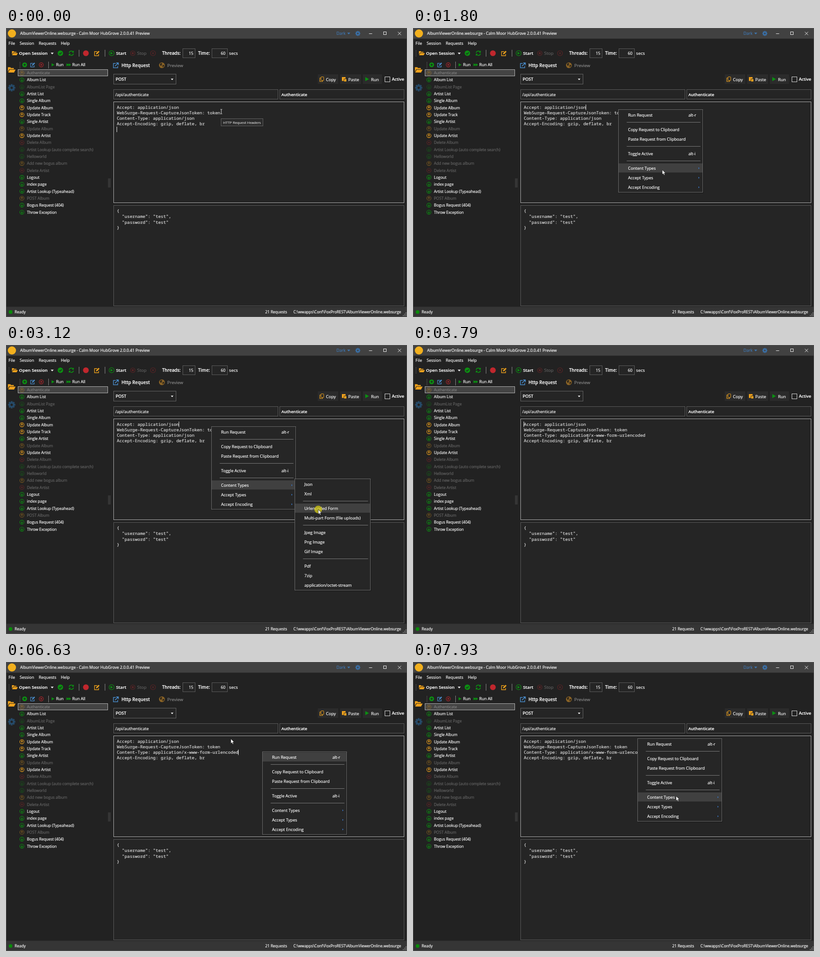
These frames come from a looping animation (881x636 px, 8000 ms). An HTML page:

```html
<!DOCTYPE html>
<html lang="en">
<head>
<meta charset="utf-8">
<title>Request editor</title>
<style>
  html, body { margin: 0; width: 100%; height: 100%; overflow: hidden; background: #222; }
  svg { display: block; width: 881px; height: 636px; }
  text { font-family: "Open Sans", "Noto Sans", sans-serif; white-space: pre;
         fill: currentColor; stroke: currentColor; stroke-width: .2px; }
  .mono { font-family: "Noto Sans Mono", "DejaVu Sans Mono", monospace; font-size: 9.47px; color: #dcdcdc; }
  .semi { font-weight: 600; }
</style>
</head>
<body>
<svg id="stage" viewBox="0 0 881 636" xmlns="http://www.w3.org/2000/svg"></svg>
<script>
const GREEN = '#0c8f12', ORANGE = '#f0a21c', RED = '#b3262b', BLUE = '#4a8fd0';
const LOOP = 8000, CHAR = 5.68, LEFT = 243.5, LINE = 12.15;

// ---- drawing helpers ----
const text = (x, y, s, size = 9.1, color = '#fff', cls = '') =>
  `<text x="${x}" y="${y}" font-size="${size}" style="color:${color}" class="${cls}">${s}</text>`;
const semi = (x, y, s, size = 9.7) => text(x, y, s, size, '#fff', 'semi');
const mono = (y, s, id = '') => `<text x="${LEFT}" y="${y}" class="mono" id="${id}">${s}</text>`;
const rect = (x, y, w, h, fill, stroke = 'none', more = '') =>
  `<rect x="${x}" y="${y}" width="${w}" height="${h}" fill="${fill}" stroke="${stroke}" ${more}/>`;
const box = (x, y, w, h, stroke = '#5c5c5c') => rect(x, y, w, h, '#252525', stroke);
const path = (d, stroke, w = 1, fill = 'none') =>
  `<path d="${d}" stroke="${stroke}" stroke-width="${w}" fill="${fill}"/>`;
const solid = (d, fill) => `<path d="${d}" fill="${fill}"/>`;
const dot = (x, y, r, fill, stroke = 'none') =>
  `<circle cx="${x}" cy="${y}" r="${r}" fill="${fill}" stroke="${stroke}" stroke-width="1.1"/>`;
const at = (x, y, body, scale = 1, opacity = 1) =>
  `<g transform="translate(${x} ${y}) scale(${scale})" opacity="${opacity}">${body}</g>`;
const group = (id, body) => `<g id="${id}">${body}</g>`;
const repeat = (n, draw) => Array.from({ length: n }, (_, i) => draw(i)).join('');

// ---- icons, centred on 0,0 ----
const arrowUp = c => path('M0 2.6V-2.2M-2-.4L0-2.4 2-.4', c, 1.2);
const arrowDown = c => `<g transform="scale(1 -1)">${arrowUp(c)}</g>`;
const cross = (c, r = 1.8) => path(`M${-r} ${-r}L${r} ${r}M${r} ${-r}L${-r} ${r}`, c, 1.2);
const ring = (c, inner, r = 4.6) => dot(0, 0, r, 'none', c) + inner;
const play = r => solid(`M${-r * .8} ${-r}L${r} 0 ${-r * .8} ${r}z`, GREEN);
const caretDown = c => solid('M-3.3-1.7H3.3L0 2z', c);
const folder = solid('M-6-4.5H-2L-.8-3H4V-1.2H-3.6L-6 3.2z', ORANGE) + solid('M-3-.3H7L4.4 4.6H-5.6z', ORANGE);
const edit = c => path('M1-4H-5V5H4V1', c, 1.3) + solid('M-1.8 2L-1.2-.6 4-5.8 6-3.8 .8 1.4z', c);
const refresh = path('M-4.8-.8A4.9 4.9 0 0 1 3.8-3M4.8 .8A4.9 4.9 0 0 1-3.8 3', GREEN, 1.7) +
  solid('M5.5-6V-1.2H.8zM-5.5 6V1.2H-.8z', GREEN);
const gear = (r, c, hole) =>
  repeat(4, i => rect(-r * .24, -r, r * .48, r * 2, c, 'none', `transform="rotate(${i * 45})"`)) +
  dot(0, 0, r * .76, c) + dot(0, 0, r * .32, hole);
const copyIcon = rect(-2, -5, 6, 8, 'none', ORANGE, 'rx=".8"') + path('M-2-2.5H-4.5V5.2H1.5V3', ORANGE, 1.1);
const pasteIcon = solid('M-5-4.5H3V-1H-1V4H-5z', ORANGE) + rect(-.2, 0, 5, 5.2, ORANGE);
const globe = dot(0, 0, 6.3, '#8a6326') + solid('M-4.5-3L-1-5 1-3-1-1-1 2-3 1zM1 0L4-1 5 1 2 5z', '#2b241a');
const grip = (x, y) => repeat(5, i => rect(x, y + i * 3, 1.2, 1.2, '#777'));
const divider = (x, y) => path(`M${x} ${y}v15`, '#8a8a8a');

// ---- fixed window parts ----
function titleBar() {
  return rect(0, 0, 881, 23.5, '#414141') + dot(13, 12, 9, '#f2b01e') +
    text(31, 15.2, 'AlbumViewerOnline.websurge - Calm Moor HubGrove 2.0.0.41 Preview', 8.69) +
    text(726, 15.2, 'Dark', 9, '#3f78b4') + at(753, 12, caretDown('#3f78b4')) +
    at(773, 12, gear(5.4, '#3a6fa6', '#414141')) +
    path('M797.5 12.5h7M861 8.5l7 7m0-7l-7 7', '#eee') + rect(829.5, 8.5, 6, 6, 'none', '#eee');
}

function toolbar() {
  return text(5.5, 36.6, 'File', 9) + text(30, 36.6, 'Session', 9) +
    text(72, 36.6, 'Requests', 9) + text(120.5, 36.6, 'Help', 9) +
    grip(6, 49) + at(19, 55.5, folder) + semi(28.5, 59, 'Open Session') + at(101.5, 56, caretDown('#eee')) +
    at(119.5, 55.5, dot(0, 0, 6, GREEN) + path('M-2.8 .2L-.8 2.2 3-1.8', '#222', 1.5)) +
    at(143.5, 55.5, refresh) + divider(160.5, 48) +
    dot(175.5, 55.5, 6.3, '#c0272d') + at(199.5, 56, edit(ORANGE)) + divider(217.5, 48) +
    at(232, 55.5, ring(GREEN, play(3), 5.6)) + semi(241.7, 59, 'Start') +
    at(278.5, 55.5, ring(RED, rect(-2, -2, 4, 4, RED), 5), 1, .4) + text(288, 59, 'Stop', 9.8, '#606060') +
    at(323, 55.5, ring(RED, cross(RED), 5.5), 1, .4) +
    semi(343, 59.2, 'Threads:', 9.8) + box(388.5, 45.5, 27, 20) + text(401.5, 59.2, '15', 8.9) +
    semi(422, 59.2, 'Time:', 9.8) + box(452.5, 45.5, 34, 20) + text(472, 59.2, '60', 8.9) +
    text(490, 59.2, 'secs', 9.8);
}

// first letter: arrow up, arrow down or cross; "-" marks an inactive request
const REQUESTS = `u-Authenticate|d Album List|d-AlbumList Page|d Artist List|d Single Album|u Update Album|u Update Track
|d Single Artist|u-Update Album|u Update Artist|x-Delete Album|d-Artist Lookup (auto complete search)|d-Helloworld
|u-Add new bogus album|x-Delete Artist|d Logout|d index page|d Artist Lookup (Typeahead)|u-POST Album
|d Bogus Request (404)|d Throw Exception`.replace(/\n/g, '').split('|');

function sidebar() {
  const icons = { u: ring(ORANGE, arrowUp(ORANGE)), d: ring(GREEN, arrowDown(GREEN)), x: ring(RED, cross(RED)) };
  const rows = REQUESTS.map((r, i) => {
    const dim = r[1] === '-';
    return at(35, 98.9 + i * 15.32, at(0, 0, icons[r[0]], 1, dim ? .42 : 1) +
      text(11, 3.2, r.slice(2), 8.5, !dim ? '#fff' : i ? '#666' : '#808080'));
  });
  return at(12, 92, folder, 1.3) + at(12.5, 131.5, gear(8, '#264a68', '#222')) + grip(30, 75) +
    at(41, 81, dot(0, 0, 5.3, GREEN) + path('M-2.7 0H2.7M0-2.7V2.7', '#222', 1.4)) +
    at(58.5, 81.2, edit(BLUE), .88) + at(77.5, 81, ring(RED, cross(RED))) + divider(93.5, 74) +
    at(103, 81, play(3.5)) + text(110, 84.3, 'Run', 8.9) +
    at(135.5, 81, play(3.2)) + at(140, 81, play(3.2)) + text(145.5, 84.3, 'Run All', 8.9) +
    rect(26.5, 91.5, 197, 14, '#444', '#b4b4b4') + rows.join('') + rect(224, 331, 6, 20, '#353535');
}

function requestPane() {
  const button = (x, w, icon, s) => rect(x, 102, w, 21, '#2b2b2b') + at(x + 9, 112.5, icon) + text(x + 18, 116.5, s, 9.3);
  const body = ['{', '  "username": "test",', '  "password": "test"', '}'];
  return at(241, 82.5, path('M0-4.5H-5V5H4.5V1', BLUE, 1.4) + path('M-1.5 1.5L5-5M1.2-5.6H5.7V-1', BLUE, 1.7)) +
    semi(253.8, 86, 'Http Request', 9.8) + at(342.5, 82, globe) + text(354.3, 86, 'Preview', 9.7, '#8a8a8a') +
    box(236.5, 101.5, 137, 22, '#666') + semi(241, 116, 'POST', 9.2) + at(365, 113, caretDown('#fff'), .85) +
    button(685, 45, copyIcon, 'Copy') + button(734, 46, pasteIcon, 'Paste') + button(784, 42, play(4.5), 'Run') +
    rect(832.5, 107.5, 11, 11, '#222', '#ddd') + semi(847.7, 116.2, 'Active', 9.2) +
    box(236.5, 135.5, 361, 21) + text(240, 149.6, '/api/authenticate', 9.2) +
    box(601.5, 135.5, 273, 21) + semi(605, 149.6, 'Authenticate', 9.1) +
    box(236.5, 162.5, 638, 222, '#b0b0b0') + box(236.5, 390.5, 638, 221) +
    body.map((s, i) => mono(406.2 + i * LINE, s)).join('');
}

function statusBar() {
  return rect(0, 613.5, 881, 22.5, '#353535') +
    dot(10, 625, 4, '#0a8a0a') + rect(6.5, 621.5, 7, 7, '#0a8a0a', 'none', 'id="busy"') +
    text(19, 628, 'Ready', 8.47) + text(569.5, 628, '21 Requests', 8.47) +
    text(631.5, 628, 'C:\\wwapps\\Conf\\FoxProREST\\AlbumViewerOnline.websurge', 8.47) +
    repeat(9, i => i % 3 + (i / 3 | 0) > 1 ? rect(872 + i % 3 * 3, 626 + (i / 3 | 0) * 3, 1.5, 1.5, '#aaa') : '') +
    rect(.5, .5, 880, 635, 'none', '#555');
}

// ---- popups: rows are 21 apart, a "-" adds a separator ----
const ROW = 21, GAP = 11;
function layout(spec) {
  const rows = [], lines = [];
  let y = 2;
  for (const s of spec.split('|')) {
    if (s === '-') { lines.push(y + 5); y += GAP; continue; }
    const [label, hint] = s.split('~');
    rows.push({ y, label, hint });
    y += ROW;
  }
  return { rows, lines, height: y };
}
const MENU = layout('Run Request~alt-r|-|Copy Request to Clipboard|Paste Request from Clipboard|-|Toggle Active~alt-i' +
  '|-|Content Types~>|Accept Types~>|Accept Encoding~>');
const SUB = layout('Json|Xml|-|Urlencoded Form|Multi-part Form (file uploads)|-|Jpeg Image|Png Image|Gif Image' +
  '|-|Pdf|7zip|application/octet-stream');

function popup(id, { rows, lines, height }, w) {
  const hint = (h, y) => !h ? '' : h === '>' ? solid(`M175.5 ${y + 8}l2.5 2-2.5 2z`, '#3a73bd') : text(153.5, y + 13.3, h);
  return group(id,
    rect(2, 2, w, height, '#000', 'none', 'opacity=".25"') + rect(0, 0, w, height, '#262626', '#6a6a6a') +
    rect(.5, 0, w - 1, 20, '#404040', 'none', `id="${id}Hover"`) +
    lines.map(y => path(`M18 ${y}H${w - 5}`, '#7c7c7c')).join('') +
    rows.map(r => text(21, r.y + 13.3, r.label) + hint(r.hint, r.y)).join(''));
}

const HEADERS = ['Accept: application/json', 'WebSurge-Request-CaptureJsonToken: token', '', 'Accept-Encoding: gzip, deflate, br'];

document.getElementById('stage').innerHTML =
  rect(0, 0, 881, 636, '#222') + titleBar() + toolbar() + sidebar() + requestPane() + statusBar() +
  HEADERS.map((s, i) => mono(178 + i * LINE, s, 'head' + i)).join('') +
  rect(0, 193, 0, 12.2, '#145a98', 'none', 'id="sel" opacity=".52"') +
  rect(0, 0, 1, 12, '#eee', 'none', 'id="caret"') +
  group('tip', rect(472.5, 199.5, 92, 16, '#2b2b2b', '#626262') + text(477, 210.6, 'HTTP Request Headers', 7.78, '#cfcfcf')) +
  popup('menu', MENU, 185) + popup('sub', SUB, 166) +
  group('mouse',
    '<circle id="halo" r="8.5" fill="#d2c814" opacity=".75"/>' +
    group('beam', path('M-2-5H-.5L0-4.5 .5-5H2M0-4.5V4.5M-2 5H-.5L0 4.5 .5 5H2', '#e8e8e8')) +
    group('arrow', path('M0 0V10.4L2.4 8.2 4 12 5.8 11.2 4.2 7.6H7.4z', '#111', .7, '#fff')));

// ---- timeline ----
const $ = id => document.getElementById(id);
const OPEN = 430, SUB_OPEN = 1850, PICK = 3130, DRAG = 4600, DROP = 6020;
const CLICK = 130, ANCHOR = 32, END = 47;
const SUB_AT = [634.5, 294.5];

// pointer stops: time, x, y
const STOPS = [
  [0, 473, 184], [330, 451, 179], [560, 451, 180], [1120, 513, 260], [1700, 540, 310], [2420, 682, 348],
  [2800, 690, 374], [3000, 686, 362], [PICK, 686, 362], [3790, 384, 202], [4250, 518, 211], [DRAG, 425, 196],
  [5080, 251, 194], [5280, 253, 194], [5880, 559, 198], [6160, 563, 197], [6630, 494, 169], [7000, 494, 168],
  [7930, 578, 295]
];
const MENUS = [
  { from: OPEN, to: PICK, x: 451.5, y: 179.5 },
  { from: DROP + CLICK, to: 6850, x: 563.5, y: 197.5 },
  { from: 6970, to: LOOP, x: 493.5, y: 168.5 }
];
const CARETS = [
  { from: 0, to: OPEN - CLICK, line: 4, col: 0, blink: 0 },
  { from: OPEN - CLICK, to: PICK, line: 0, col: 24, blink: 650 },
  { from: PICK, to: DRAG, line: 0, col: 0, blink: 3310 },
  { from: DROP, to: LOOP, line: 2, col: END, blink: 6160 }
];

const between = (t, a, b) => t >= a && t < b;
const active = (list, t) => list.find(e => between(t, e.from, e.to));
const show = (id, on) => $(id).setAttribute('visibility', on ? 'inherit' : 'hidden');
const move = (id, x, y) => $(id).setAttribute('transform', `translate(${x} ${y})`);
const ease = p => p * p * (3 - 2 * p);

function pointer(t) {
  const i = STOPS.findIndex(s => s[0] > t);
  if (i < 0) return STOPS[STOPS.length - 1].slice(1);
  const [a, ax, ay] = STOPS[i - 1], [b, bx, by] = STOPS[i], p = ease((t - a) / (b - a));
  return [ax + (bx - ax) * p, ay + (by - ay) * p];
}

// a row stays lit until the pointer reaches the next one
const rowAt = (list, y) => list.rows.filter(r => r.y <= y).pop() || list.rows[0];

function draw(t) {
  const [x, y] = pointer(t);
  const menu = active(MENUS, t), sub = between(t, SUB_OPEN, PICK), drag = between(t, DRAG, DROP);
  const isArrow = menu || t > DROP + CLICK;
  move('mouse', x, y);
  show('arrow', isArrow);
  show('beam', !isArrow);
  show('halo', between(t, DRAG, 5900) || between(t, PICK - CLICK, PICK) || MENUS.some(m => between(t, m.from - CLICK, m.from)));
  show('busy', t < 60);
  show('tip', t < 200);
  $('head2').textContent = 'Content-Type: application/' + (t < PICK ? 'json' : 'x-www-form-urlencoded');

  show('menu', menu);
  if (menu) {
    move('menu', menu.x, menu.y);
    const row = sub ? MENU.rows.find(r => r.label === 'Content Types') : rowAt(MENU, y - menu.y);
    $('menuHover').setAttribute('y', row.y - .5);
  }
  show('sub', sub);
  if (sub) {
    const dy = y - SUB_AT[1], row = rowAt(SUB, dy);
    move('sub', ...SUB_AT);
    show('subHover', x > SUB_AT[0] && dy < row.y + ROW);
    $('subHover').setAttribute('y', row.y - .5);
  }

  show('sel', drag);
  if (drag) {
    const col = Math.max(0, Math.min(END, Math.round((x - LEFT) / CHAR)));
    $('sel').setAttribute('x', LEFT + Math.min(col, ANCHOR) * CHAR);
    $('sel').setAttribute('width', Math.abs(col - ANCHOR) * CHAR);
  }

  const caret = active(CARETS, t);
  show('caret', caret && (t - caret.blink + LOOP * 1.06) % 1060 < 530);
  if (caret) move('caret', LEFT - .5 + caret.col * CHAR, 168.5 + caret.line * LINE);
}

const start = performance.now();
function tick() {
  draw((performance.now() - start) % LOOP);
  requestAnimationFrame(tick);
}
tick();
</script>
</body>
</html>
```
